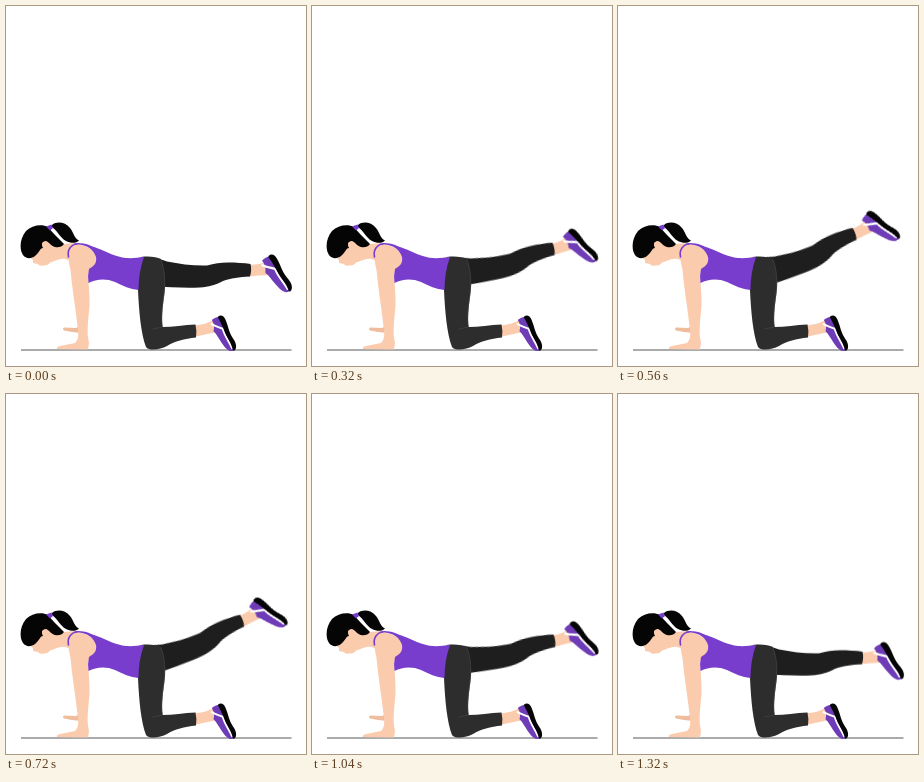
Recreate the animation shown at these times as an HTML page. Size 300x360 px, loop 1.36 s.

```html
<!DOCTYPE html>
<html lang="en">
<head>
<meta charset="utf-8">
<title>Leg raise</title>
<style>
  html, body { margin: 0; width: 100%; height: 100%; overflow: hidden; background: #fff; }
  svg { display: block; width: 100vw; height: 100vh; }
  .skin { fill: #fbcbad; }
  .shade { fill: #efbd9e; }
  .top { fill: #783dcc; }
  .shoe { fill: #6f3cb8; }
  .dark { fill: #050505; }
  .near { fill: #2d2d2d; }
  .far { fill: #1e1e1e; }
  .line { fill: none; stroke-linecap: round; stroke-linejoin: round; }
  #leg {
    transform-origin: 146px 266px;
    animation: raise 1360ms infinite;
  }
  @keyframes raise {
    0% { transform: rotate(0deg); animation-timing-function: cubic-bezier(.35, .12, .6, 1); }
    48.5% { transform: rotate(-22.8deg); animation-timing-function: linear; }
    50% { transform: rotate(-22.8deg); animation-timing-function: cubic-bezier(.37, 0, .63, 1); }
    100% { transform: rotate(0deg); }
  }
</style>
</head>
<body>
<svg viewBox="0 0 300 360">
  <defs>
    <!-- heel at the origin, sole along x, ankle towards +y -->
    <g id="shoe">
      <path class="shoe" d="M1 2 C0 6 0 9 1 12 C5 11 9 12 13 15 C18 13 22 13 27 12 C32 11 37 10 40 7 Q42 4 40 1 Z"/>
      <path class="line" d="M5 14 C8 12 11 8 14.5 4.6 C22 6 30 3.6 38 3.6" stroke="#fff" stroke-width="2.2"/>
      <path class="dark" d="M0 4 C-1 0 2 -2 6 -2 C15 -2 21 0 28 -1.5 C34 -3 39 -2 41 1 C42 3 41 4 40 3.5 C33 2 26 4 20 4 C13 4 7 4 3 4.5 Q1 5 0 4 Z"/>
    </g>
  </defs>

  <path class="line" d="M15 344 H285.5" stroke="#8f8f8f" stroke-width="1.5" style="stroke-linecap: butt"/>

  <g id="leg">
    <path class="skin" d="M242 258.5 C249 259 255 258 260 256 L264 269 C257 269 249 270 242 270.5 Z"/>
    <use href="#shoe" transform="translate(266 248) rotate(60.5)"/>
    <path class="far" d="M146 252 C152 252 156 254 161 255.5 C174 258 188 260 201 259.5 C208 257.5 215 256.5 222 256.5 C230 256.5 238 257 244.5 258 Q246 264 244 270.5 C233 271 225 272.5 217 275 C209 279 203 281 194 281.5 C180 282 164 281.5 146 280 Z"/>
  </g>

  <!-- supporting leg -->
  <path class="skin" d="M188 319.5 C196 319 202 317 208 314 L212 326 C204 327 197 329 188 331 Z"/>
  <use href="#shoe" transform="translate(215.5 309) rotate(67) scale(.91)"/>
  <path class="near" d="M135 251 C143 250 151 251 155 253 C158 260 159.5 272 159 282 C157.500 297 155 309 156.500 321 C167 321 178 319 189.500 318.500 Q191 325 190 331.500 C178 333 169 335 161 340 C154 344 143 345 140 341 C135 328 133 306 132 284 L130 282 Z"/>
  <path class="line" d="M155 254 C159 264 159.500 276 158 288 C156 300 155 312 156.500 321 L147 323" stroke="#484848" stroke-width=".6"/>

  <!-- far hand -->
  <path class="shade" d="M75 319 L70 322 L58 321.500 Q56 323 58 324.500 L66 326 L75 327 Z"/>

  <!-- face and neck -->
  <path class="skin" d="M21 249 L27 254 L27 257 L32 258 Q33 260.500 37 259.500 Q42 260 44 256.500 C50 255 56 250 64 255 L74 238 C66 236.500 60 238 54 239 L42 231 Z"/>

  <!-- arm -->
  <path class="skin" d="M66 240 C75 236 87 242 90 250 C92 258 86 262 82.500 267 C82 276 84 288 83.500 300 C82.500 311 81 323 82 332 Q84 338 81.500 343.500 L51 343 Q50 341 54 340 L69 337 C74 332 72 325 71 316 C69 299 66 281 64.500 264 C62 253 61 245 66 240 Z"/>

  <!-- shirt -->
  <path class="top" d="M67 237.500 C77 235.500 84 239.500 92 242.500 C101 246 110 251 120 252 C127 252.500 132 251.500 138 251 C134 262 132.500 273 132.500 284 C124 283 117 280 109 276 C100 272 90 273 82.500 277 Q81.500 269 83 263 C88 260 91 257 90 251 C88 244 81 239 73 238.500 Z"/>
  <path class="line" d="M62.500 251 C61 244 65 238.500 71 238" stroke="#783dcc" stroke-width="1.6"/>

  <!-- hair -->
  <path class="dark" d="M17 249 C13 243 14 232 20 225 C26 219 36 218 42 221 C46 226 52 232 58 238 Q55 242 49 241 C45 240 43 236 40 235 C36 235 35 239 37 242 C34 242 33 247 29 250 C25 253 20 253 17 249 Z"/>
  <path class="skin" d="M36 237 Q40 234 41 239 Q40 243 37 241 Z"/>
  <path class="dark" d="M46 219 C51 215 59 216 64 222 C68 227 68 232 73 234.500 C70 238 64 237 60 235 C54 232 52 225 46 221 Z"/>
  <path class="top" d="M40 220.500 L45.500 218.500 L47 222 L44 224.500 Z"/>
</svg>
</body>
</html>
```
